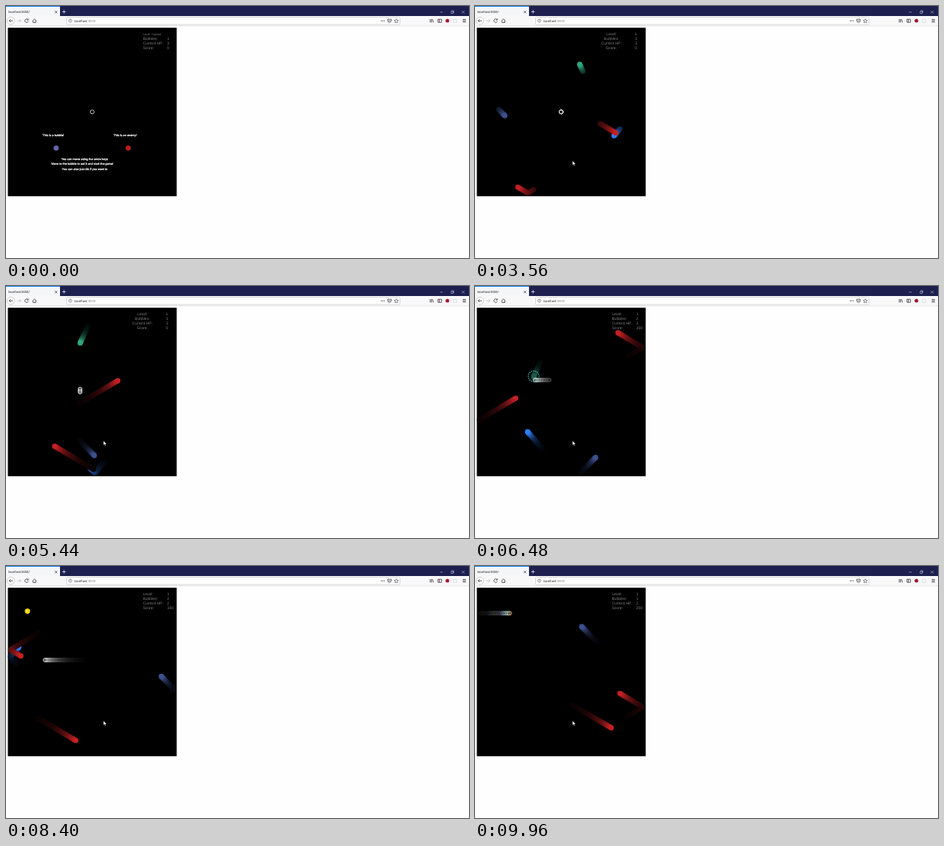
Animation of 600x327 px, one loop 10 s. Source, as an HTML page with a canvas:

```html
<!DOCTYPE html>
<html lang="en">
<head>
<meta charset="utf-8">
<title>Bubble game</title>
<style>
  html, body { margin: 0; width: 100%; height: 100%; overflow: hidden; background: #fefefe; }
  canvas, svg { position: absolute; left: 0; top: 0; width: 600px; height: 327px; }
  svg { font-family: "Liberation Sans", Arial, sans-serif; text-rendering: geometricPrecision; }
  .icon { fill: none; stroke: #3c3c42; stroke-width: .8; }
  #hud { font-size: 5px; fill: #7c7c7c; }
  #intro { font-size: 3.85px; fill: #fff; stroke: #fff; stroke-width: .2; text-anchor: middle; }
</style>
</head>
<body>
<canvas id="game" width="600" height="327"></canvas>
<svg viewBox="0 0 600 327">
  <!-- title bar -->
  <rect width="600" height="13" fill="#1d1f4e"/>
  <rect width="70" height="13" fill="#f5f6f7"/>
  <rect width="70" height="1" fill="#0a84ff"/>
  <text x="3" y="9.4" font-size="4.1" fill="#222">localhost:8000/</text>
  <path class="icon" d="M63.3 6.3l3 3m0-3l-3 3"/>
  <path d="M73 7.5h4.4M75.2 5.3v4.4" stroke="#e8e8f0" stroke-width=".8"/>
  <g fill="none" stroke="#a9aac4" stroke-width=".7">
    <path d="M562.5 8h3.4M590.8 6.2l3.4 3.4m0-3.4l-3.4 3.4"/>
    <path d="M576.8 7h2.6v2.6h-2.6zM577.7 7v-.9h2.6v2.6h-.9"/>
  </g>
  <!-- toolbar -->
  <rect y="13" width="600" height="13" fill="#f8f8f9"/>
  <rect y="25.6" width="600" height=".6" fill="#d8d8da"/>
  <rect x="78.5" y="14.5" width="432" height="9.6" rx="1" fill="#fff" stroke="#cfcfd2" stroke-width=".8"/>
  <circle cx="6.3" cy="19.2" r="4.8" fill="#fff" stroke="#b9b9bc" stroke-width=".7"/>
  <path class="icon" d="M9 19.2H4m2-2l-2 2 2 2"/>
  <path class="icon" style="stroke:#bbb" d="M14.4 19.2h5m-2-2l2 2-2 2"/>
  <path class="icon" d="M28.6 17.7a2.3 2.3 0 1 0 .3 2.2M29 16.3v1.8h-1.8"/>
  <path class="icon" d="M34.2 19.3l2.6-2.5 2.6 2.5M35 19v2.5h3.6V19"/>
  <circle class="icon" cx="83.4" cy="19.2" r="2" style="stroke-width:.5"/>
  <path class="icon" d="M83.4 18.9v1.3M83.4 17.9v.5" style="stroke-width:.5"/>
  <text x="88.5" y="20.7" font-size="4.3" fill="#222">localhost<tspan fill="#8b8b90">:8000</tspan></text>
  <g fill="#3c3c42"><circle cx="486.4" cy="19.2" r=".6"/><circle cx="488.3" cy="19.2" r=".6"/><circle cx="490.2" cy="19.2" r=".6"/></g>
  <path class="icon" d="M494.8 17.2h4.4v1.8a2.2 2.2 0 0 1-4.4 0zM496 18.7l1 1 1-1"/>
  <path class="icon" style="stroke-width:.6" d="M505.8 16.6l.8 1.8 1.9.2-1.4 1.3.4 1.9-1.7-1-1.7 1 .4-1.9-1.4-1.3 1.9-.2z"/>
  <path class="icon" d="M549.8 17v4.4M551.3 17v4.4M552.6 17l1.2 4.4"/>
  <path class="icon" d="M559.8 17.2h4.6v4h-4.6zM561.6 17.2v4"/>
  <circle cx="572" cy="19.2" r="2.4" fill="#a3182c"/>
  <rect x="579.8" y="17.2" width="4" height="4" fill="none" stroke="#d8d8da" stroke-width=".7"/>
  <path class="icon" d="M591.8 17.5h4.2M591.8 19.2h4.2M591.8 20.9h4.2"/>
  <!-- game text -->
  <g id="hud"></g>
  <g id="intro">
    <text x="61.3" y="168.8">This is a bubble!</text>
    <text x="154.5" y="168.8">This is an enemy!</text>
    <text x="102" y="200">You can move using the arrow keys</text>
    <text x="99" y="206.3">Move to the bubble to eat it and start the game!</text>
    <text x="102" y="212.5">You can also just die if you want to</text>
  </g>
  <path id="cursor" d="M126.4 201v5.4l1.2-1.1.9 2 .9-.4-.9-1.9h1.7z" fill="#fff" stroke="#222" stroke-width=".25"/>
</svg>
<script>
const LOOP = 10000, RESET = 2640, START = 3360, REF = 4400;
const STEP = 1000 / 60, FADE = 0.9, TAIL = 30, R = 3.4;
const BOX = { x0: 5.5, x1: 217.5, y0: 31.5, y1: 242.7 };
const RED = [196, 32, 36];
const RAINBOW = [[165, 220, 225], [225, 150, 70], [95, 140, 215], [205, 205, 205]];
const POWER = 9260;

// time, level, bubbles, HP, score
const HUD = [
  [0, "", 1, 3, 0], [2520, "", 1, 2, 0], [2560, "", 1, 1, 0], [2600, "", 1, 0, 0],
  [RESET, 1, 3, 3, 0], [6400, 1, 2, 3, 100], [6770, 1, 2, 2, 100], [8900, 1, 1, 2, 200]
];

// player waypoints: time, x, y
const PATH = [
  [0, 111.7, 137.4], [1600, 111.7, 137.4], [2080, 155, 137.4], [2115, 158, 137.4],
  [2550, 158, 177.5], [RESET, 158, 177.5], [RESET, 111.7, 137.4], [4230, 111.7, 137.4],
  [4400, 97.5, 137.4], [4415, 96, 137.4], [5400, 96, 137.4], [5570, 96, 122],
  [6270, 96, 122], [6490, 77, 122], [7530, 80, 122], [7760, 102, 122], [7790, 104, 122],
  [7850, 104, 122], [8500, 41, 122], [8520, 41, 122], [8880, 41, 88], [8900, 41, 88],
  [9080, 41, 72], [9190, 41, 61.3], [9550, 7, 61.3], [9960, 45, 61.3], [LOOP, 48, 61.3]
];

// bouncing balls: position at time `at`, velocity in px/s, visible from..to
const BALLS = [
  { color: [48, 165, 128], at: REF, x: 118, y: 37, vx: -21, vy: -46, from: START, to: 6400 },
  { color: [45, 125, 245], at: REF, x: 148, y: 205, vx: -38.4, vy: 43.8, from: START, to: 8900 },
  { color: [60, 80, 142], at: REF, x: 72.5, y: 177, vx: 40.3, vy: 41.3, from: START, to: LOOP },
  { color: RED, at: REF, x: 40, y: 185, vx: 100.8, vy: -59.7, from: START, to: LOOP },
  { color: RED, at: REF, x: 168, y: 215, vx: -100.8, vy: 60, from: START, to: 6770 },
  { color: RED, at: 7760, x: 26, y: 188, vx: 100.5, vy: 60, from: 6770, to: LOOP }
];

const BURSTS = [
  { t: 6400, x: 76, y: 117, color: "#37a8a4" },
  { t: 8900, x: 39, y: 88, color: "#2d72d8" }
];

const ctx = document.getElementById("game").getContext("2d");
const hud = document.getElementById("hud");
const intro = document.getElementById("intro");
const cursor = document.getElementById("cursor");

const LABELS = ["Level:", "Bubbles:", "Current HP:", "Score:"];
const addText = y => {
  const el = document.createElementNS("http://www.w3.org/2000/svg", "text");
  el.setAttribute("y", y);
  return hud.appendChild(el);
};
const rows = LABELS.map((_, i) => [addText(37.6 + i * 6.2), addText(37.6 + i * 6.2)]);

// triangle wave between two walls
function fold(v, lo, hi) {
  const w = hi - lo, m = (((v - lo) % (2 * w)) + 2 * w) % (2 * w);
  return lo + (m < w ? m : 2 * w - m);
}

function ballAt(b, t) {
  const s = (t - b.at) / 1000;
  return [fold(b.x + b.vx * s, BOX.x0, BOX.x1), fold(b.y + b.vy * s, BOX.y0, BOX.y1)];
}

function playerAt(t) {
  let i = 0;
  while (i < PATH.length - 2 && PATH[i + 1][0] <= t) i++;
  const [t0, x0, y0] = PATH[i], [t1, x1, y1] = PATH[i + 1];
  const k = Math.min(1, Math.max(0, (t - t0) / (t1 - t0)));
  return [x0 + (x1 - x0) * k, y0 + (y1 - y0) * k];
}

const dim = (c, k) => `rgb(${c.map(v => Math.round(v * k)).join()})`;

function circle(x, y, r) {
  ctx.beginPath();
  ctx.arc(x, y, r, 0, 2 * Math.PI);
}

function disc(x, y, r, color) {
  circle(x, y, r);
  ctx.fillStyle = color;
  ctx.fill();
}

// calls stamp(time, brightness) from the oldest echo to the newest
function echo(t, from, to, stamp) {
  for (let n = TAIL; n >= 0; n--) {
    const s = t - n * STEP;
    if (s >= from && s <= to) stamp(s, FADE ** n);
  }
}

function drawPlayer(t) {
  ctx.lineWidth = 0.9;
  echo(t, t < RESET ? 0 : RESET, LOOP, (s, k) => {
    const color = s < POWER ? [215, 215, 215] : RAINBOW[Math.floor(s / 45) % RAINBOW.length];
    circle(...playerAt(s), 2.5);
    ctx.strokeStyle = dim(color, k);
    ctx.stroke();
  });
}

function drawBurst(b, t) {
  const age = (t - b.t) / 1000, r = 9 - 25 * age;
  if (age < 0 || r <= 0) return;
  for (let i = 0; i < 16; i++) {
    const a = i * Math.PI / 8;
    disc(b.x + r * Math.cos(a), b.y + r * Math.sin(a), 0.85, b.color);
  }
}

function drawHud(t) {
  const state = HUD.filter(h => h[0] <= t).pop();
  const tutorial = t < RESET;
  const centred = t >= RESET && t < 6400;
  hud.setAttribute("text-anchor", centred ? "middle" : "start");
  rows.forEach(([label, value], i) => {
    label.textContent = tutorial && i === 0 ? "Level: Tutorial" : LABELS[i];
    label.setAttribute("font-size", tutorial && i === 0 ? 3.8 : 5);
    label.setAttribute("x", centred ? 176.8 : 177.4);
    value.textContent = state[i + 1];
    value.setAttribute("x", 208.7);
  });
}

function draw(t) {
  ctx.fillStyle = "#fefefe";
  ctx.fillRect(0, 0, 600, 327);
  ctx.fillStyle = "#000";
  ctx.fillRect(2.4, 28.2, 218.8, 218.6);
  ctx.save();
  ctx.beginPath();
  ctx.rect(2.4, 28.2, 218.8, 218.6);
  ctx.clip();
  if (t < RESET) {
    disc(65, 184.3, R, "#6464a4");
    disc(158.4, 184.3, R, "#b81e1c");
  }
  for (const b of BALLS) {
    echo(t, b.from, b.to, (s, k) => disc(...ballAt(b, s), R, dim(b.color, k)));
  }
  if (t >= 7000 && t < POWER) disc(27.8, 58.6, R, "#ffdc14");
  drawPlayer(t);
  BURSTS.forEach(b => drawBurst(b, t));
  ctx.restore();
  drawHud(t);
  intro.style.display = t < RESET ? "" : "none";
  cursor.style.display = t >= 480 ? "" : "none";
}

const begin = performance.now();
function tick() {
  draw((performance.now() - begin) % LOOP);
  requestAnimationFrame(tick);
}
tick();
</script>
</body>
</html>
```
